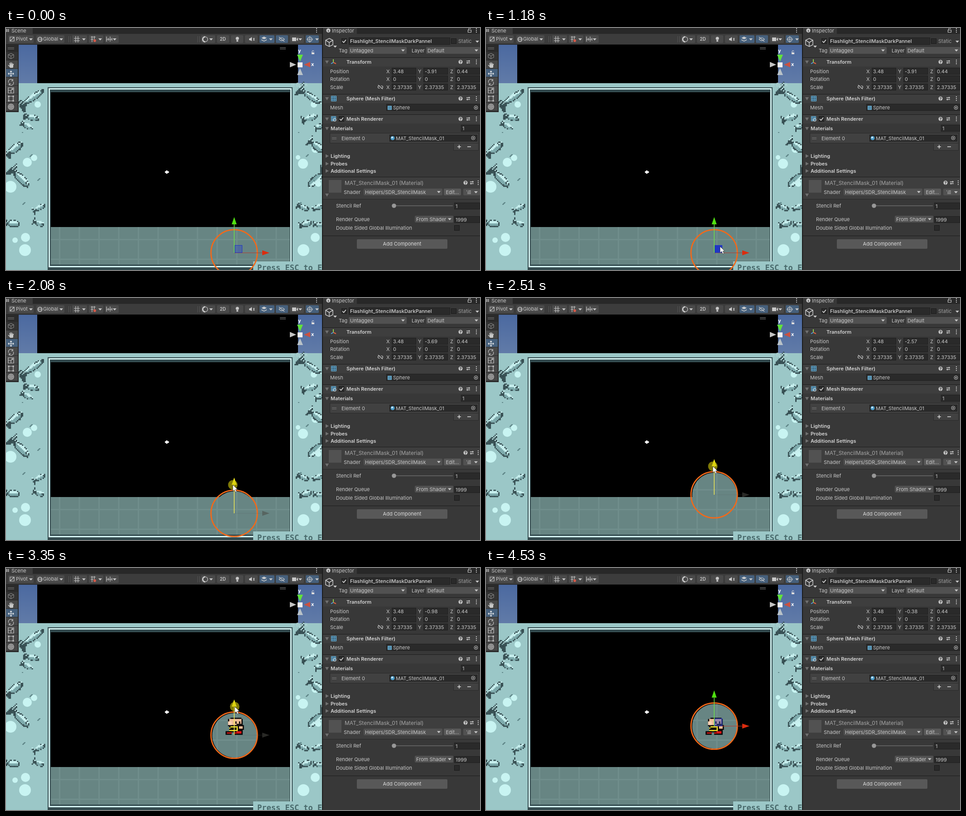
Write an HTML page with a canvas that moves like this. It is 1047 by 535 pixels and loops after 4860 ms.

```html
<!DOCTYPE html>
<html>
<head>
<meta charset="utf-8">
<style>
html, body { margin: 0; width: 100%; height: 100%; overflow: hidden; background: #383838; }
canvas { display: block; }
</style>
</head>
<body>
<canvas id="stage" width="1047" height="535"></canvas>
<script>
const stage = document.getElementById('stage');
const backdrop = document.createElement('canvas');
backdrop.width = stage.width;
backdrop.height = stage.height;
let g = backdrop.getContext('2d');

const TEXT = '#c8c8c8', DARK = '#2a2a2a', FLOOR = '#678583', INK = '#344b4f';

function rect(x, y, w, h, fill, stroke) {
  g.fillStyle = fill;
  g.fillRect(x, y, w, h);
  if (stroke) {
    g.strokeStyle = stroke;
    g.lineWidth = 1;
    g.strokeRect(x + .5, y + .5, w - 1, h - 1);
  }
}
function round(x, y, w, h, fill, r = 2) {
  g.fillStyle = fill;
  g.beginPath();
  g.roundRect(x, y, w, h, r);
  g.fill();
}
function poly(points, fill) {
  g.fillStyle = fill;
  g.beginPath();
  for (let i = 0; i < points.length; i += 2) g.lineTo(points[i], points[i + 1]);
  g.closePath();
  g.fill();
}
function path(d, color = TEXT, width = 1.2, x = 0, y = 0) {
  g.save();
  g.translate(x, y);
  g.strokeStyle = color;
  g.lineWidth = width;
  g.stroke(new Path2D(d));
  g.restore();
}
function disc(x, y, r, fill) {
  g.fillStyle = fill;
  g.beginPath();
  g.arc(x, y, r, 0, 7);
  g.fill();
}
function ring(x, y, r, color = TEXT, width = 1.2) {
  g.strokeStyle = color;
  g.lineWidth = width;
  g.beginPath();
  g.arc(x, y, r, 0, 7);
  g.stroke();
}
function text(s, x, y, color = TEXT, font = '11px', align = 'left') {
  g.font = font + ' Inter, sans-serif';
  g.fillStyle = color;
  g.textAlign = align;
  g.fillText(s, x, y);
}
const bold = (s, x, y) => text(s, x, y, '#d4d4d4', '600 11px');
const caret = (x, y) => poly([x - 4, y - 2, x + 4, y - 2, x, y + 2.5], TEXT);
function fold(x, y, open) {
  poly(open ? [x - 4, y - 3, x + 4, y - 3, x, y + 4] : [x - 3, y - 4, x + 4, y, x - 3, y + 4], '#707070');
}
function field(s, x, y, w, h = 15, indent = 3) {
  rect(x, y, w, h, DARK, '#1f1f1f');
  text(s, x + indent, y + 11.5);
}
function dropdown(s, x, y, w, h = 15) {
  round(x, y, w, h, '#515151');
  text(s, x + 3, y + 11.5);
  caret(x + w - 8, y + h / 2);
}
function check(x, y, on) {
  rect(x, y, 12, 12, DARK, '#191919');
  if (on) path('M2 6L5 9L10 3', '#e0e0e0', 1.6, x, y);
}
const kebab = (x, y) => [-4, 0, 4].forEach(d => rect(x - 1, y + d - 1, 2, 2, TEXT));
function headerIcons(x1, x2, x3, y) {
  disc(x1, y, 4.5, TEXT);
  text('?', x1, y + 3.5, '#383838', '700 9px', 'center');
  path('M-4 -2H4M-4 2H4M2 -4V0M-2 0V4', TEXT, 1.3, x2, y);
  kebab(x3, y);
}
function header(s, y, open = true) {
  rect(700, y, 347, 19, '#3e3e3e');
  rect(700, y - 1, 347, 1, '#1c1c1c');
  fold(709, y + 9, open);
  bold(s, 752, y + 13);
  headerIcons(1004, 1021, 1039, y + 9);
}
function meshIcon(x, y, s) {
  rect(x, y, s, s, '#26455b');
  const k = s / 3;
  path(`M.5 .5H${s - .5}V${s - .5}H.5ZM${k} 0V${s}M${2 * k} 0V${s}M0 ${k}H${s}M0 ${2 * k}H${s}`, '#79c7ee', 1, x, y);
}
function picker(x, y) { ring(x, y, 4, TEXT, 1); disc(x, y, 1.6, TEXT); }
const cube = 'M0 -9L8 -5V5L0 9L-8 5V-5ZM-8 -5L0 0L8 -5M0 0V9';

// Pixel-art fish: outline, light back and shaded belly from one ellipse rule.
function fish(cx, cy, len, h, angle) {
  const c = Math.cos(angle), s = Math.sin(angle), reach = len * 1.6, P = 2.7;
  for (let i = Math.floor((cx - reach) / P); i < (cx + reach) / P; i++)
    for (let j = Math.floor((cy - reach) / P); j < (cy + reach) / P; j++) {
      const dx = i * P - cx, dy = j * P - cy;
      const u = dx * c + dy * s, v = dy * c - dx * s;
      const d = (u / len) ** 2 + (v / h) ** 2;
      const tail = u < -len * .8 && u > -len * 1.4 && Math.abs(v) < (-u - len * .7) * 1.1;
      if (d > 1 && !tail) continue;
      const eye = Math.hypot(u - len * .55, v + h * .15) < 1.6;
      const color = eye || d > .6 && (v > 0 || (i + j) % 3) ? INK : v < -h * .1 ? '#c9f1f0' : '#7da9ab';
      g.fillStyle = color;
      g.fillRect(i * P, j * P, P + .2, P + .2);
    }
}

function floor(x, y, w, h) {
  rect(x, y, w, h, FLOOR);
  g.save();
  g.beginPath();
  g.rect(x, y, w, h);
  g.clip();
  for (let gx = 119; gx < 627; gx += 43.5) rect(gx - 2, y, 3, h, '#708e8c');
  for (let gy = 161; gy < 523; gy += 43.6) rect(x, gy, w, 3, '#708e8c');
  g.restore();
}

function drawSea() {
  const sky = g.createLinearGradient(0, 37, 0, 122);
  sky.addColorStop(0, '#4b69a0');
  sky.addColorStop(1, '#617ba8');
  rect(0, 37, 698, 86, sky);
  rect(69, 37, 576, 85, '#000');
  rect(0, 122, 698, 413, '#9bc7c7');
  [[70, 169, 7], [62, 287, 7], [47, 297, 10], [10, 351, 13], [43, 463, 10], [20, 469, 6], [42, 491, 13],
   [680, 169, 7], [683, 268, 8], [656, 300, 11], [645, 286, 5], [690, 345, 6], [683, 463, 10], [657, 491, 13]]
    .forEach(([x, y, r]) => disc(x, y, r, '#c8f4f2'));
  [[60, 151, 27, 7, -.6], [58, 197, 15, 7, .2], [47, 216, 12, 6, .5], [20, 264, 19, 9, -.65], [33, 333, 24, 9, .8],
   [74, 395, 13, 6, -.5], [15, 431, 14, 8, .1], [73, 431, 11, 6, .4],
   [674, 152, 25, 7, .6], [672, 197, 15, 7, -.3], [692, 216, 9, 6, -.4], [688, 262, 18, 9, .65], [682, 335, 22, 9, 2.4],
   [657, 396, 12, 6, .4], [690, 394, 11, 6, -.4], [662, 431, 12, 7, -.3], [692, 434, 11, 6, .1]]
    .forEach(f => fish(...f));
  for (let i = 0; i < 16; i++) {
    const x = 35 + i * 17 % 50, y = 230 + i * 53 % 160;
    rect(x, y, 3, 2, '#648b8d');
    if (x < 70) rect(x + 610, y, 3, 2, '#648b8d');
  }
  rect(92, 131, 541, 404, INK);
  rect(94, 133, 537, 396, '#d5f4f3');
  rect(97, 136, 531, 390, INK);
  rect(99, 142, 528, 298, '#000');
  floor(99, 440, 528, 83);
  rect(97, 529, 535, 6, INK);
  rect(353, 315, 4, 7, '#fff');
  rect(351, 317, 9, 3, '#fff');
  rect(546, 516, 152, 19, '#9bc7c7');
  g.font = 'bold 17px "DejaVu Sans Mono", monospace';
  g.fillStyle = '#48696b';
  g.textAlign = 'left';
  g.fillText('Press ESC to E', 555, 536);
}

function drawSceneTools() {
  rect(0, 0, 698, 13, '#282828');
  rect(0, 0, 59, 13, '#3c3c3c');
  path('M1 2V9M5 2V9M-1 4H7M-1 7H7', TEXT, 1);
  text('Scene', 12, 10);
  kebab(686, 5);
  rect(0, 13, 698, 24, '#3c3c3c');
  rect(0, 36, 698, 1, '#222');
  [[5, 56], [67, 62], [146, 33], [183, 32], [219, 30], [431, 31], [466, 27], [497, 27], [528, 28], [560, 33, 1],
   [596, 27, 1], [627, 31], [662, 29, 1]].forEach(([x, w, on]) => round(x, 16, w, 17, on ? '#46607c' : '#4a4a4a'));
  [55, 122, 172, 208, 240, 453, 585, 650, 687].forEach(x => caret(x, 25));
  [138, 142, 423, 427].forEach(x => rect(x, 18, 1, 14, '#555'));
  text('Pivot', 22, 28);
  text('Global', 82, 28);
  text('2D', 479, 28, TEXT, '600 10px', 'center');
  path('M9 20H18V29H9ZM9 29L18 20');
  ring(75, 25, 5);
  path('M70 25H80M75 20C71 24 71 27 75 30C79 27 79 24 75 20', TEXT, 1);
  path('M150 23H163M150 28H163M154 18V32M159 18V32');
  path('M187 20H198M187 25H193M190 18V31M195 18V25', TEXT, 1.2);
  disc(196, 28, 3, '#d05a4a');
  path('M222 19V30M226 22V28M230 19V30M234 22V28M222 25H234');
  ring(440, 25, 5.5);
  path('M440 19.5A5.5 5.5 0 0 0 440 30.5', TEXT, 3);
  disc(511, 23, 3.5, TEXT);
  rect(509, 27, 4, 3, TEXT);
  poly([537, 23, 539, 23, 543, 20, 543, 29, 539, 27, 537, 27], TEXT);
  path('M546 22L549 28M549 22L546 28');
  poly([564, 22, 570, 19, 576, 22, 570, 25], TEXT);
  path('M564 26L570 29L576 26', TEXT, 1.5);
  path('M603 25Q609 18 615 25Q609 31 603 25M603 20L615 30');
  rect(632, 21, 9, 8, TEXT);
  poly([642, 24, 645, 21, 645, 29, 642, 26], TEXT);
  ring(671, 25, 5);
  path('M664 25H678M671 18V32');

  rect(0, 37, 28, 149, '#2b2b2b');
  path('M4 43.5H18M4 46.5H18', '#777', 1);
  path('M605 43.5H618M605 46.5H618', '#888', 1);
  for (let i = 0; i < 7; i++) rect(0, 53 + i * 18.7, 26, 17.7, i == 2 ? '#46607c' : i ? '#484848' : '#333');
  path('M0 -6L6 -3V3L0 6L-6 3V-3ZM-6 -3L0 0L6 -3M0 0V6', '#888', 1.1, 11, 62);
  round(8, 80, 8, 8, TEXT);
  path('M8.5 81V77M11 80V76M13.5 80V77M16 82V79M8 85L5 82', TEXT, 1.7);
  path('M-6 0H6M0 -6V6M-4 -2L-6 0L-4 2M4 -2L6 0L4 2M-2 -4L0 -6L2 -4M-2 4L0 6L2 4', '#eee', 1.2, 11, 101);
  path('M-5 1A5 5 0 0 1 4 -4M5 -1A5 5 0 0 1 -4 4M4 -7V-3H0M-4 7V3H0', TEXT, 1.2, 11, 120);
  path('M-6 -6H6V6H-6ZM-6 0H0V6M0 0L4 -4M1 -4H4V-1', TEXT, 1.2, 11, 138);
  path('M-5 -5H5V5H-5Z', TEXT, 1.2, 11, 156);
  [6, 16].forEach(x => [151, 161].forEach(y => rect(x - 1.5, y - 1.5, 3, 3, TEXT)));
  ring(11, 174, 6);
  path('M-6 0H6M0 -6V6M-3 -3H3V3H-3Z', TEXT, 1.1, 11, 174);

  poly([643, 59, 656, 59, 649.5, 74], '#62e33c');
  poly([672, 75, 672, 87, 658, 81], '#c85242');
  poly([627, 75, 627, 87, 641, 81], '#c4c4c4');
  poly([643, 104, 656, 104, 649.5, 89], '#b9c2c8');
  rect(644, 76, 11, 11, '#f2f2f2');
  text('y', 645, 54, '#fff', '700 11px');
  text('x', 674, 84, '#fff', '700 11px');
  rect(675, 54, 6, 4, '#ddd');
  path('M676 54V52A2 2 0 0 1 680 52', '#ddd', 1);
  path('M629 122.5H637M629 125.5H637M629 128.5H637', '#b3d5d7', 1);
  text('Back', 641, 129, '#b3d5d7');
}

function drawInspector() {
  rect(698, 0, 349, 535, '#383838');
  rect(698, 0, 2, 535, '#1b1b1b');
  rect(775, 0, 272, 13, '#282828');
  disc(712, 5.5, 4.5, TEXT);
  rect(711.3, 4.5, 1.5, 4, '#383838');
  text('Inspector', 720, 10);
  path('M1020.5 4.5H1027.5V9.5H1020.5ZM1022 4V2A2 2 0 0 1 1026 2');
  kebab(1039, 5);

  path(cube, TEXT, 1.5, 714, 32);
  caret(727, 41);
  check(741, 23, true);
  rect(757, 21, 224, 16, DARK, '#1f1f1f');
  text('Flashlight_StencilMaskDarkPannel', 760, 33, '#d8d8d8', '500 11px');
  check(983, 23);
  text('Static', 999, 33, '#a0a0a0');
  caret(1041, 30);
  text('Tag', 735, 54);
  dropdown('Untagged', 757, 42, 128);
  text('Layer', 896, 54);
  dropdown('Default', 928, 42, 119);

  header('Transform', 66);
  path('M723 76V69', '#8fd14f', 2);
  path('M723 76L729 79', '#e0623e', 2);
  path('M723 76L718 79', '#4aa3e0', 2);
  ['Position', 'Rotation', 'Scale'].forEach((label, row) => {
    const y = 88.5 + row * 17.4 | 0;
    text(label, 716, y + 11.5);
    [['X', 840, 852], ['Y', 910, 922], ['Z', 981, 993]].forEach(([axis, lx, fx], col) => {
      text(axis, lx, y + 11.5);
      field(row == 2 ? '2.37335' : row == 1 ? '0' : ['3.48', '', '0.44'][col], fx, y, 54);
    });
  });
  path('M826 128H824A2.5 2.5 0 0 0 824 133H826M828 128H830A2.5 2.5 0 0 1 830 133H828M822 126L832 135');

  header('Sphere (Mesh Filter)', 147);
  meshIcon(718, 150, 12);
  text('Mesh', 716, 180);
  field('Sphere', 840, 168, 207, 15, 15);
  meshIcon(843, 172, 9);
  picker(1038, 176);

  header('Mesh Renderer', 192);
  meshIcon(718, 195, 11);
  ring(726, 203, 3, '#ddd');
  check(735, 195, true);
  fold(709, 222, true);
  bold('Materials', 717, 226);
  field('1', 1005, 214, 42);
  rect(715, 232, 329, 23, '#414141', '#2a2a2a');
  path('M720 242.5H730M720 245.5H730', '#777', 1);
  text('Element 0', 741, 248);
  field('MAT_StencilMask_01', 847, 236, 194, 15, 14);
  disc(854, 243.5, 4.5, '#4a9cc9');
  disc(853, 242, 2, '#d7eef8');
  picker(1032, 243);
  rect(988, 254, 56, 17, '#414141', '#2a2a2a');
  path('M997 262.5H1005M1001 258.5V266.5M1019 262.5H1027', '#ddd', 1.5);
  [['Lighting', 287], ['Probes', 304], ['Additional Settings', 320]].forEach(([s, y]) => {
    fold(709, y - 4, false);
    bold(s, 717, y);
  });

  rect(700, 330, 347, 48, '#3e3e3e');
  rect(700, 329, 347, 1, '#1c1c1c');
  rect(700, 378, 347, 1, '#282828');
  rect(713, 336, 28, 28, '#525252');
  fold(709, 369, true);
  text('MAT_StencilMask_01 (Material)', 748, 347, '#a6a6a6', '12px');
  headerIcons(1015, 1029, 1043, 342);
  text('Shader', 746, 367);
  dropdown('Helpers/SDR_StencilMask', 790, 355, 174);
  round(967, 355, 38, 15, '#585858');
  text('Edit...', 986, 366.5, TEXT, '11px', 'center');
  round(1010, 355, 37, 15, '#515151');
  path('M1017 360H1019M1021 360H1027M1019 363H1027M1019 366H1027');
  caret(1038, 363);
  text('Stencil Ref', 729, 397);
  rect(857, 392, 130, 2, '#5e5e5e');
  disc(857, 393, 4.8, '#999');
  field('1', 990, 386, 57);
  text('Render Queue', 729, 427);
  dropdown('From Shader', 903, 415, 85);
  field('1999', 990, 416, 57);
  text('Double Sided Global Illumination', 729, 446);
  check(990, 436);
  rect(700, 459, 347, 1, '#1c1c1c');
  round(775, 467, 200, 21, '#585858');
  text('Add Component', 875, 481, '#ddd', '11px', 'center');
}

function hero() {
  const box = (x, y, w, h, c) => rect(485 + x * 2.7, 331 + y * 2.7, w * 2.7, h * 2.7, c);
  const skin = '#f0bd98', black = '#0b0808', red = '#d81616', yellow = '#efe12c';
  box(4, 0, 9, 1, black);
  box(2, 1, 12, 6, black);
  box(3, 1, 10, 5, skin);
  box(2, 3, 3, 3, '#f8d2b4');
  box(8, 3, 1, 2, black);
  box(11, 3, 1, 2, black);
  box(9, 5, 4, 1, black);
  box(3, 7, 11, 5, black);
  box(4, 7, 6, 1, yellow);
  box(3, 10, 7, 1, yellow);
  box(9, 8, 1, 3, yellow);
  box(3, 8, 1, 1, yellow);
  box(11, 6, 4, 4, black);
  box(11, 7, 3, 2, skin);
  box(0, 11, 5, 3, black);
  box(7, 11, 7, 3, black);
  box(1, 12, 4, 1, red);
  box(7, 12, 2, 1, red);
  box(9, 11, 4, 2, red);
}

function track(keys, t) {
  let i = 0;
  while (i < keys.length - 2 && t >= keys[i + 1][0]) i++;
  const [a, b] = [keys[i], keys[i + 1]];
  const k = Math.min(1, Math.max(0, (t - a[0]) / (b[0] - a[0])));
  return a.slice(1).map((v, n) => v + (b[n + 1] - v) * k);
}
const height = t => track([[1730, 497], [1940, 493], [2010, 488], [2080, 476], [2290, 458], [2440, 441], [2510, 435],
  [2860, 407], [3000, 394.5], [3420, 364.5], [3700, 351.5], [3840, 349.5]], t)[0];
const pointerKeys = [[130, 857, 524], [200, 800, 512], [340, 680, 478], [480, 590, 455], [620, 547, 447], [690, 542, 443],
  [900, 527, 463], [1180, 517, 483], [1320, 512, 468], [1600, 502, 436], [1670, 501, 434], [2510, 501, 0],
  [3000, 504, 0], [3770, 506.5, 0], [4040, 507, 287], [4110, 509, 290], [4180, 524, 303], [4250, 585, 342],
  [4320, 700, 405], [4390, 855, 470], [4460, 1012, 522], [4530, 1100, 560]];

function tick(t) {
  const run = [[4110, 4530], [2510, 3910], [1800, 2430], [130, 1670]].find(r => t >= r[0]);
  return run ? Math.min(run[1], run[0] + Math.floor((t - run[0]) / 70) * 70) : 0;
}

function draw(t) {
  const cx = 504, cy = height(t), dragging = t >= 1800 && t < 4110;
  const hoverY = t >= 1530 && t < 4180, hoverPlane = t >= 1040 && t < 1390;
  g.drawImage(backdrop, 0, 0);

  g.save();
  g.beginPath();
  g.rect(99, 142, 528, 298);
  g.clip();
  g.beginPath();
  g.arc(cx + .8, cy + .5, 49.3, 0, 7);
  g.clip();
  floor(99, 142, 528, 298);
  hero();
  g.restore();
  ring(cx, cy, 51.2, '#f2691a', 2.8);

  const axisX = dragging ? 'rgba(75,75,70,.55)' : '#dc2c0e';
  rect(cx, cy - .5, 63, 1, dragging ? 'rgba(80,90,88,.25)' : '#b03a30');
  poly([566, cy - 5.5, 566, cy + 5.5, 582, cy], axisX);
  if (!dragging) rect(505, cy - 17, 17, 17, hoverPlane ? '#2136c4' : 'rgba(50,75,190,.45)', '#2136c4');
  rect(cx - .7, cy - 63, 1.5, 63, hoverY ? '#f0e956' : '#6ee04a');
  poly([cx - 5.5, cy - 63, cx + 5.5, cy - 63, cx, cy - 79], hoverY ? '#f5ec1c' : '#50e010');

  if (t >= 130 && t < 4530) {
    let [x, y] = track(pointerKeys, t);
    if (dragging) {
      y = cy - 63;
      disc(x, y, 10.5, 'rgba(205,195,10,.62)');
    }
    g.save();
    g.translate(x, y);
    const arrow = new Path2D('M0 0V14L3.4 11L6 16.5L8.6 15.4L6.2 10.2H10.5Z');
    g.fillStyle = '#fff';
    g.fill(arrow);
    g.strokeStyle = '#222';
    g.lineWidth = .7;
    g.stroke(arrow);
    g.restore();
  }
  const value = -.38 - (height(t - 70) - 349.5) / 41.8;
  text(String(+value.toFixed(2)), 925, 100);
}

drawSea();
drawSceneTools();
drawInspector();
g = stage.getContext('2d');
(function frame() {
  draw(tick(performance.now() % 4860));
  requestAnimationFrame(frame);
})();
</script>
</body>
</html>
```
